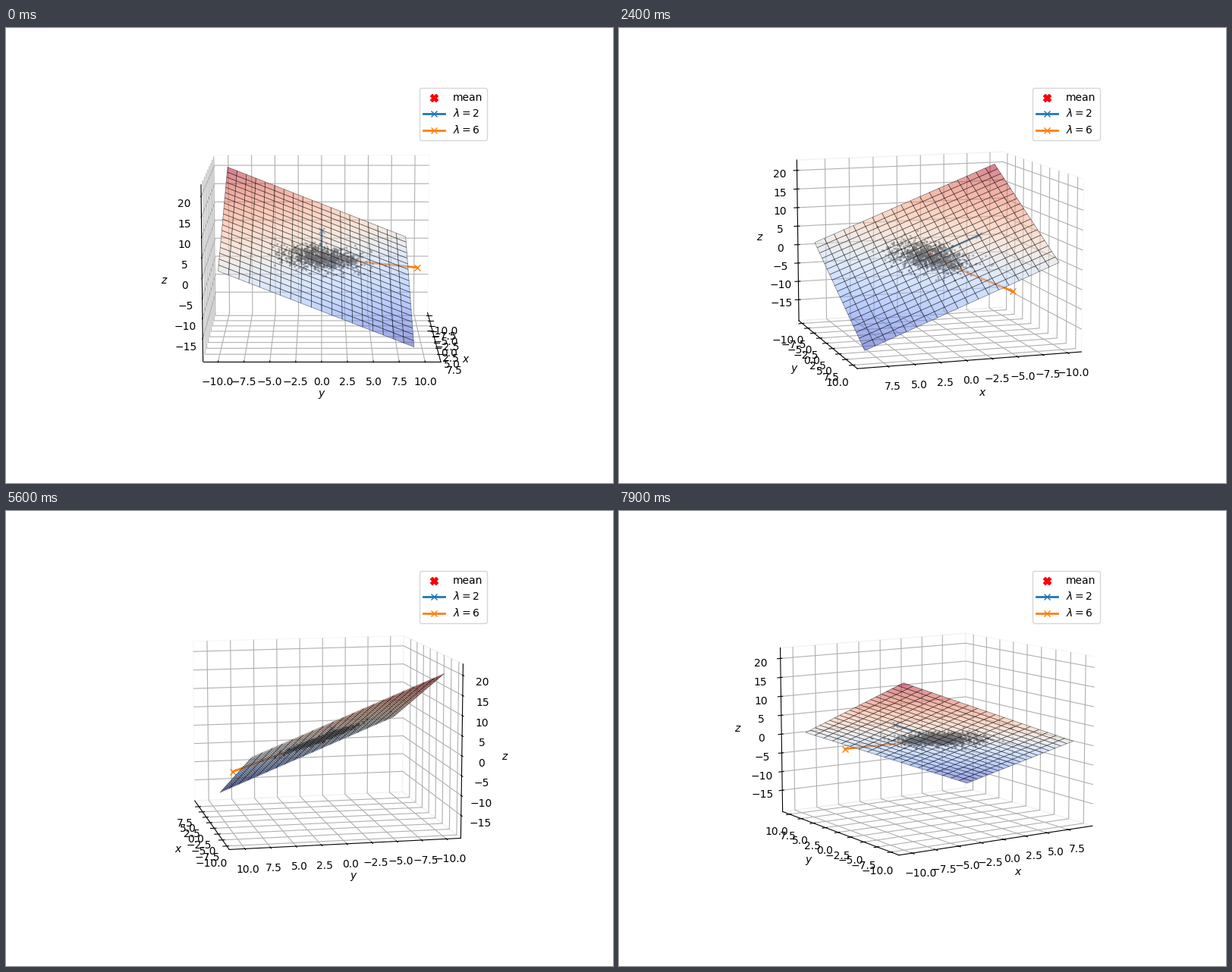
Recreate the animation shown at these times as a matplotlib script. Size 800 px wide and 600 px high, loop 8 s.

```python
import numpy as np
import matplotlib.pyplot as plt
from matplotlib.animation import FuncAnimation

FRAMES = 80
STEP = 3  # degrees per frame

fig = plt.figure(figsize=(8, 6), dpi=100)
ax = fig.add_subplot(projection="3d")

# Points with covariance [[2, -2, 0], [-2, 4, -2], [0, -2, 2]], all on x + y + z = 0
rng = np.random.default_rng(4)
minor = np.array([-1, 0, 1]) / np.sqrt(2)
major = np.array([-1, 2, -1]) / np.sqrt(6)
coef = rng.standard_normal((2, 1000))
coef -= coef.mean(axis=1, keepdims=True)
cloud = np.outer(minor, np.sqrt(2) * coef[0]) + np.outer(major, np.sqrt(6) * coef[1])

ax.scatter(*cloud, c="black", s=4.5, linewidths=0, alpha=0.5)
ax.scatter([0], [0], [0], c="red", marker="X", s=50, label="mean")

for axis, value in ((minor, 2), (major, 6)):
    tip = axis * 5.01 * np.sqrt(value)
    ax.plot(*[(0, t) for t in tip], lw=2, marker="x", markevery=[1],
            label=rf"$\lambda = {value}$")

side = np.arange(-10, 10)
gx, gy = np.meshgrid(side, side)
ax.plot_surface(gx, gy, -gx - gy, cmap="coolwarm", alpha=0.5,
                edgecolor="black", linewidth=0.5)


def padded(low, high):
    """Data range plus a 5 % margin and the small gap to the panes."""
    half = (high - low) * 1.1 * 25 / 48
    mid = (low + high) / 2
    return mid - half, mid + half


ax.set_xticks(np.arange(-10, 7.6, 2.5))
ax.set_yticks(np.arange(-10, 10.1, 2.5))
ax.set_zticks(np.arange(-15, 21, 5))
ax.set_xlim(*padded(-10, 9))
ax.set_ylim(*padded(-10, 10.05))
ax.set_zlim(*padded(-18, 20))
ax.set_xlabel("$x$")
ax.set_ylabel("$y$")
ax.set_zlabel("$z$")
for axis in (ax.xaxis, ax.yaxis, ax.zaxis):
    axis.pane.fill = False
ax.legend(loc="upper right")


def update(i):
    ax.view_init(elev=10, azim=STEP * i)
    return []


anim = FuncAnimation(fig, update, frames=FRAMES, interval=100,
                     repeat=True, repeat_delay=0, blit=False)
plt.show()
```
